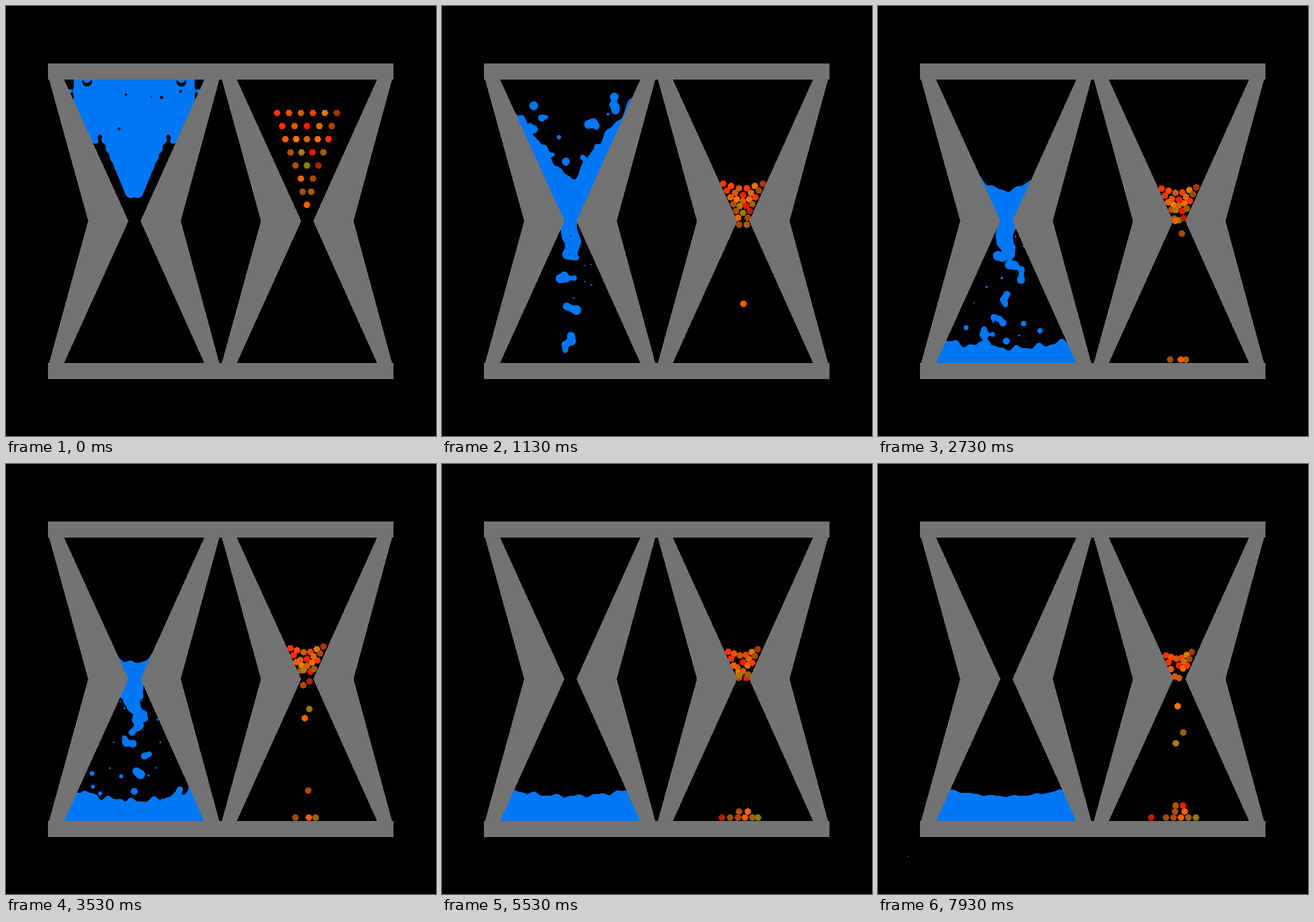
Write an HTML page with a canvas that moves like this. It is 748 by 748 pixels and loops after 8 s.

```html
<!DOCTYPE html>
<html lang="en">
<head>
<meta charset="utf-8">
<title>Hourglasses</title>
<style>
  html, body { margin: 0; width: 100%; height: 100%; overflow: hidden; background: #000; }
  canvas, svg { position: absolute; left: 0; top: 0; width: 748px; height: 748px; }
  #water { filter: url(#goo); }
</style>
</head>
<body>
<canvas id="water" width="748" height="748"></canvas>
<canvas id="grains" width="748" height="748"></canvas>
<svg viewBox="0 0 748 748" fill="#737373" shape-rendering="crispEdges">
  <defs>
    <filter id="goo" x="0" y="0" width="1" height="1" color-interpolation-filters="sRGB">
      <feGaussianBlur stdDeviation="2.4"/>
      <feColorMatrix values="0 0 0 0 0  0 0 0 0 .467  0 0 0 0 .961  0 0 0 14 -5.6"/>
    </filter>
    <g id="glass">
      <path d="M75 128H101L213 374 101 621H75L143 374Z"/>
      <path d="M371 128H345L234 374 345 621H371L304 374Z"/>
    </g>
  </defs>
  <use href="#glass"/>
  <use href="#glass" x="300.5"/>
  <path d="M73 100H674V128H73ZM73 621H674V649H73Z"/>
</svg>
<script>
const LOOP = 8000, STEP = 200 / 3, HALF_G = 134;
const AXIS = 223, HALF_WIDTH = 122, NECK = 350;
const BRIGHT = '#0077f5', DIM = '#04529f';
const water = document.getElementById('water').getContext('2d');
const grains = document.getElementById('grains').getContext('2d');

const mix = (a, b, k) => a + (b - a) * k;
const clamp = v => Math.max(0, Math.min(1, v));
const range = (count, make) => Array.from({ length: count }, (_, i) => make(i));

function randomFrom(seed) {
  return (low = 0, high = 1) => {
    seed = (seed * 16807) % 2147483647;
    return mix(low, high, seed / 2147483647);
  };
}
function disc(ctx, x, y, r) {
  if (r <= 0) return;
  ctx.beginPath();
  ctx.arc(x, y, r, 0, 7);
  ctx.fill();
}
function poly(ctx, points) {
  ctx.beginPath();
  points.forEach(([x, y]) => ctx.lineTo(x, y));
  ctx.closePath();
}

// Surfaces: time, height on the axis, rise to the wall, power of the rise, ripple.
const upper = [[0, 122, 0, 1, 0], [1.13, 306, 160, 1, 6], [1.93, 296, 130, 2, 2.5],
  [3.53, 346, 200, 2, 2.5], [4.2, 384, 0, 2, 0]];
const lower = [[1.1, 626, 0, 2, 0], [1.93, 605, 6, 2, 4], [3.53, 586, 30, 2, 4],
  [4.6, 575, 8, 2, 3], [6.6, 581, 23, 2, 1.8], [7.93, 578, 17, 2, 1.2]];

function surfaceAt(keys, t) {
  let n = 0;
  while (n < keys.length - 2 && t > keys[n + 1][0]) n++;
  const a = keys[n], b = keys[n + 1], k = clamp((t - a[0]) / (b[0] - a[0]));
  const [, level, rise, power, ripple] = a.map((v, i) => mix(v, b[i], k));
  return x => level - rise * Math.abs((x - AXIS) / HALF_WIDTH) ** power
    + ripple * (Math.sin(x * .17 + t * 5) + .7 * Math.sin(x * .31 - t * 7));
}
function fillBody(surface, floor) {
  const line = range(66, i => 93 + i * 4).map(x => [x, surface(x)]);
  poly(water, [[93, floor], ...line, [353, floor]]);
  water.fill();
}

// Lumps of water that leave the neck, each a short crooked chain of discs.
const random = randomFrom(77);
const lumps = range(36, i => {
  const start = .33 + i * .1, late = start > 3.3 ? .6 : 1;
  const angle = random(0, 6.3);
  return {
    start, speed: start < .75 ? random(20, 230) : random(0, 40), drift: random(-34, 34),
    discs: range(Math.round(random(1.5, 4.4) * late), n => {
      const bend = angle + random(-.6, .6);
      return [Math.cos(bend) * n * 9, Math.sin(bend) * n * 9, random(4.5, 8.5) * late];
    })
  };
});
const dots = range(64, i => ({
  start: .33 + i * .056, speed: random(0, 190), drift: random(-75, 75), size: random(1.2, 2.1)
}));
const splashes = range(24, i => ({
  start: 1.25 + i * .1, x: AXIS + random(-115, 115), speed: random(70, 180), size: random(3, 7)
}));
const spray = range(26, () => {
  const dx = random(-80, 80);
  return [AXIS + dx, 306 - Math.abs(dx) * 1.3 - random(-8, 62), random(2.5, 8)];
});
const holes = range(11, () => [AXIS + random(-85, 85), random(132, 215), random(2, 5)]);

const dropY = (drop, age) => NECK + drop.speed * age + HALF_G * age * age;

// At first the water hangs as a block that does not yet touch the glass.
function carveBlock(t) {
  const gap = 1 - t / .45;
  if (gap <= 0) return;
  const fall = HALF_G * t * t;
  const bothSides = draw => [-1, 1].forEach(side => draw(dx => AXIS + side * dx));
  water.globalCompositeOperation = 'destination-out';
  bothSides(at => {
    poly(water, [[at(88), 238], [at(73), 238], [at(73 - 15 * gap), 238 - 18 * gap],
      [at(31 - 18 * gap), 332], [at(0), 332 + fall], [at(0), 385], [at(43), 385]]);
    water.fill();
    poly(water, [[at(135), 118], [at(122 - 17 * gap), 118], [at(122 - 17 * gap), 165], [at(135), 165]]);
    water.fill();
    disc(water, at(82), 131 + fall, 10 * gap);
  });
  holes.forEach(([x, y, r]) => disc(water, x, y + fall, r * gap));
  water.globalCompositeOperation = 'source-over';
  bothSides(at => {
    range(7, i => disc(water, at(mix(50, 6, i / 6)), mix(233, 327, i / 6) + fall, 7));
    disc(water, at(82), 128 + fall, 6);
    disc(water, at(112), 148 + fall, 4);
    disc(water, at(67), 235 + fall, 5);
  });
}

function drawSpout(t) {
  const front = NECK + 4 * HALF_G * Math.max(0, t - .35) ** 2;
  const fade = clamp((4.35 - t) / .35);
  range(7, i => {
    const y = 366 + i * 11;
    const r = 9 + 6 * Math.sin(i / 6 * Math.PI);
    if (y < front) disc(water, AXIS + Math.sin(i * 1.3 - t * 9) * i * 1.2, y, r * fade);
  });
}

function drawWater(t) {
  water.clearRect(0, 0, 748, 748);
  water.save();
  poly(water, [[92, 118], [354, 118], [242, 374], [354, 632], [92, 632], [205, 374]]);
  water.clip();
  water.fillStyle = BRIGHT;
  if (t < 4.2) fillBody(surfaceAt(upper, t < 1.13 ? t * t / 1.13 : t), 376);
  carveBlock(t);
  if (t > .45 && t < 1.7) {
    const fall = (t / 1.13) ** 2;
    spray.forEach(([x, y, r]) => disc(water, x, 128 + (y - 128) * fall, r));
  }
  drawSpout(t);
  const pool = surfaceAt(lower, t);
  fillBody(pool, 640);
  lumps.forEach(lump => {
    const age = t - lump.start;
    if (age <= 0 || age > 1.5) return;
    const spread = clamp(age * 2);
    lump.discs.forEach(([dx, dy, r]) =>
      disc(water, AXIS + lump.drift * age + dx * spread, dropY(lump, age) + dy * spread, r));
  });
  splashes.forEach(({ start, x, speed, size }) => {
    const age = t - start;
    if (age > 0 && age < 1.5) disc(water, x, pool(x) + 8 - speed * age + HALF_G * age * age, size);
  });
  water.restore();
}

const rows = [[6, 52], [5, 43], [5, 37.5], [4, 28.5], [3, 20], [2, 10.5], [2, 7.5], [1, 0]];
const colours = ('f30 ff4d00 cc5c00 ff4000 e07a00 a83800 ff3000 d65a00 ff2000 d07000 a84800 f26000 ff7800 ' +
  'd06000 ff6a00 ff3800 b85000 b07810 f01800 a06000 b04c00 8c7c00 b82000 ff6000 b04800 9c5000 a86000 ff5c00')
  .split(' ').map(c => '#' + c);
const CENTRE = 523.5, PACKED = 1.13, END = 7.93;

// Each grain starts in a loose wedge and packs into the funnel.
const wedge = rows.flatMap(([count, half], row) => range(count, i => {
  const u = count > 1 ? 2 * i / (count - 1) - 1 : 0, depth = Math.max(0, 1 - row / 6);
  return {
    u, startX: CENTRE + half * u, startY: 186 + row * 22.85,
    x: CENTRE + u * (6.5 + 28 * depth ** 1.5),
    y: 319 + 10.2 * row - 10 * depth * Math.abs(u)
  };
}));

// Release order: grain, time, place in the heap counted in grain widths.
const releases = [[27, 0, 1], [25, 1.1, -1], [26, 1.1, 2], [24, 2.33, 0], [23, 2.82, 1.5], [21, 2.91, 3],
  [20, 3.25, .2], [22, 3.36, -3], [16, 5.9, .3], [18, 5.9, 1.3], [17, 7.02, .6], [19, 7.1, 1.6],
  [12, 7.34, 2.5], [13, 8.3, 1], [7, 8.6, 0]];
releases.forEach(([index, time, place], n) => {
  const grain = wedge[index];
  const below = releases.slice(0, n).filter(r => Math.abs(r[2] - place) < .9);
  grain.level = Math.max(-1, ...below.map(r => wedge[r[0]].level)) + 1;
  Object.assign(grain, {
    time, exitX: CENTRE + 6.5 * Math.sign(grain.u),
    exitY: time ? Math.max(374, grain.y) : grain.startY,
    restX: 514 + 13 * place, restY: 615 - 10.5 * grain.level
  });
});

function grainAt(grain, t) {
  const { u, x, y, startX, startY, time, exitX, exitY, restX, restY } = grain;
  if (t >= time) {
    const span = Math.sqrt((restY - exitY) / HALF_G), k = Math.min(1, (t - time) / span);
    const slide = k < 1 ? 0 : 1 - Math.exp((time + span - t) / .7);
    return [mix(exitX, restX, mix(.3 * k, 1, slide)), mix(exitY, restY, k * k)];
  }
  if (t < PACKED) {
    const k = clamp(HALF_G * t * t / (y - startY));
    return [mix(startX, x, k * k), mix(startY, y, k)];
  }
  if (time) {
    const k = (t - PACKED) / (time - PACKED);
    return [mix(x, exitX, k), mix(y, exitY, k)];
  }
  const sink = clamp((t - PACKED) / (END - PACKED)) ** .7;
  return [mix(x, CENTRE, .35 * sink), y + sink * (21 - 3 * u)];
}

function drawGrains(t) {
  grains.clearRect(0, 0, 748, 748);
  wedge.forEach((grain, i) => {
    const [x, y] = grainAt(grain, t);
    const turn = grain.time === 0 ? 0 : (i * 2.4 % 1.05) * clamp((t - .6) * 2);
    poly(grains, range(6, n => {
      const angle = turn + n * Math.PI / 3;
      return [x + 6.2 * Math.cos(angle), y + 6.2 * Math.sin(angle)];
    }));
    grains.fillStyle = colours[i];
    grains.fill();
  });
}

function drawDots(t) {
  const pool = surfaceAt(lower, t);
  grains.fillStyle = t > 1.6 && t < 4 ? BRIGHT : DIM;
  dots.forEach(dot => {
    const age = t - dot.start, x = AXIS + dot.drift * age, y = dropY(dot, age);
    if (age > 0 && y > 385 && y < pool(x)) disc(grains, x, y, dot.size);
  });
  // One stray drop leaks out beside the base.
  const left = END - t;
  grains.fillStyle = '#04387c';
  if (left < .65) disc(grains, 52 + 17 * left, 682 - 165 * left + HALF_G * left * left, 1.6);
}

let begin;
function frame(now) {
  begin ??= now;
  const elapsed = (now - begin) % LOOP;
  const t = Math.floor((elapsed + 5) / STEP) % 120 * STEP / 1000;
  drawWater(t);
  drawGrains(t);
  drawDots(t);
  requestAnimationFrame(frame);
}
requestAnimationFrame(frame);
</script>
</body>
</html>
```
